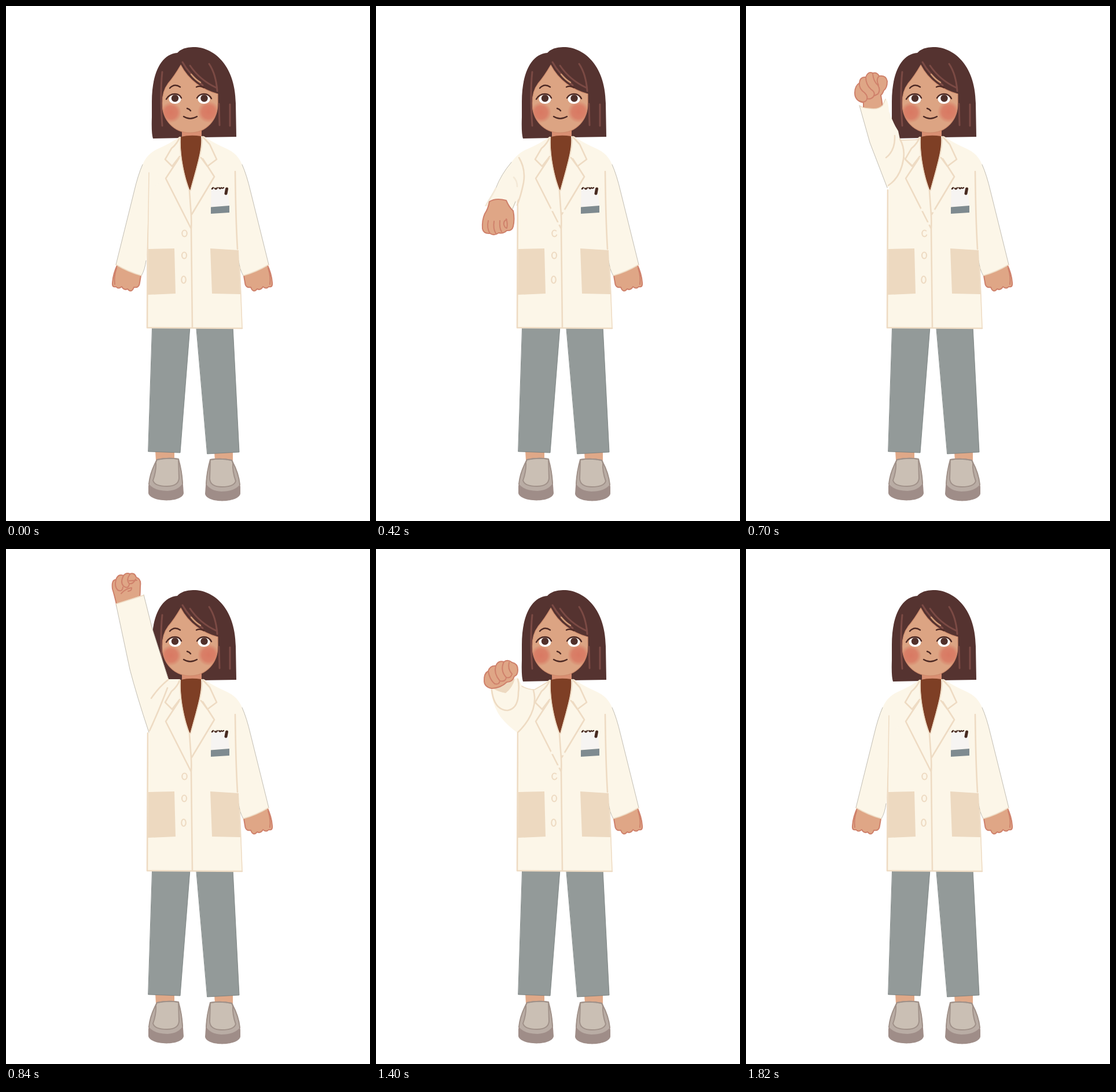
An HTML page for the animation above (1960 ms loop, 629 by 890 pixels).

```html
<!DOCTYPE html>
<html lang="en">
<head>
<meta charset="utf-8">
<title>Raising a hand</title>
<style>
  html, body { margin: 0; width: 100%; height: 100%; overflow: hidden; background: #fff; }
  svg { display: block; width: 100%; height: 100%; }
  path, ellipse { stroke-linecap: round; stroke-linejoin: round; }
  .coat { fill: #fcf6e8; }
  .edge { stroke: #b3aea2; stroke-width: .8; fill: none; }
  .seam { fill: none; stroke: #eedbc3; stroke-width: 2.6; }
  .thin { stroke-width: 1.5; }
  .soft { stroke: #f4e9d7; }
  .pocket { fill: #edd9c0; }
  .skin { fill: #dfa888; }
  .hand { fill: #dfa686; stroke: #cf816b; stroke-width: 2; }
  .fold { fill: none; stroke: #cf816b; stroke-width: 2; }
  .ink { fill: none; stroke: #4d2a25; stroke-width: 2.4; }
  .strand { fill: none; stroke: #7b4a44; stroke-width: 3; }
  .pants { fill: #939a99; stroke: #727978; stroke-width: .8; }
  .pose, #gaps { visibility: hidden; }
  #rest { visibility: visible; }
</style>
</head>
<body>
<svg viewBox="0 0 629 890" xmlns="http://www.w3.org/2000/svg">
  <defs>
    <radialGradient id="blush">
      <stop offset="0" stop-color="#d8745f" stop-opacity=".9"/>
      <stop offset=".6" stop-color="#d8745f" stop-opacity=".75"/>
      <stop offset="1" stop-color="#d8745f" stop-opacity="0"/>
    </radialGradient>
    <path id="face" d="M302 102Q291 121 280 134Q270 147 270 168C270 197 290 219 318 219C346 219 366 197 366 168V152Q346 147 329 134Q312 121 302 102Z"/>
    <clipPath id="faceClip"><use href="#face"/></clipPath>

    <g id="restArm">
      <path class="hand" d="M193 446L234 460L231 478Q230 488 221 486Q217 497 210 489Q204 492 200 485Q194 490 190 485Q183 487 184 478Q185 463 193 446Z"/>
      <path class="fold" d="M191 453Q186 468 188 481"/>
      <path class="coat" d="M301 226Q283 238 262 247Q244 255 236 274Q228 292 221 322L190 447Q212 460 234 466Q242 450 243 430L247 320L272 300L280 260Z"/>
      <path class="edge" d="M236 274Q228 292 221 322L190 447M234 466Q240 456 242 440"/>
      <path class="seam thin" d="M190 447Q212 460 234 466"/>
    </g>

    <g id="shoe">
      <path fill="#9f8d88" d="M260 784Q249 806 246 830L246 842C250 858 304 859 307 842L306 828Q304 800 298 783Z"/>
      <path fill="#b9aca4" d="M260 784Q249 806 247 826Q256 838 279 838Q298 837 305 825Q303 802 298 783Z"/>
      <path fill="#cabfb4" stroke="#a09189" stroke-width="2" d="M261 784Q280 780 298 783L299 816Q298 830 278 830Q257 830 254 820Q260 803 259 788Z"/>
      <path fill="none" stroke="#a09189" stroke-width="2" d="M261 784Q280 780 298 783Q304 804 305 825M260 786Q249 806 247 826"/>
    </g>
  </defs>

  <!-- legs -->
  <path class="skin" d="M258 769H291V785H259ZM360 770H392V787H361Z"/>
  <path class="pants" d="M253 554H318L301 772L246 770ZM329 554H392L403 771L348 774Z"/>
  <use href="#shoe"/>
  <use href="#shoe" transform="translate(651 1) scale(-1 1)"/>

  <!-- head -->
  <path fill="#553330" d="M254 229Q251 220 252 192V166C252 116 268 83 296 81Q305 71 323 71C355 70 396 98 397 168L398 226L337 227L304 228Z"/>
  <path fill="#d98f72" d="M304 208H338V229H304Z"/>
  <use href="#face" fill="#dca483" stroke="#cd8a6c" stroke-width="1.2"/>
  <g clip-path="url(#faceClip)">
    <circle cx="285" cy="184" r="18" fill="url(#blush)"/>
    <circle cx="350" cy="183" r="19" fill="url(#blush)"/>
  </g>
  <path class="strand" d="M270 114Q266 150 270 207M305 97Q316 117 340 137M318 103Q335 128 363 141M351 100Q363 118 365 147M368 169L369 206M387 170V207"/>
  <path fill="none" stroke="#cf9b75" stroke-width="2.5" d="M320 118Q327 127 336 132"/>
  <g id="eyes">
    <ellipse cx="292" cy="161" rx="10.5" ry="8" fill="#fff"/>
    <ellipse cx="342" cy="161" rx="10.5" ry="8" fill="#fff"/>
    <circle cx="292" cy="159.500" r="6.2" fill="#50302a"/>
    <circle cx="342.500" cy="159.500" r="6.2" fill="#50302a"/>
    <path class="ink" d="M277 161Q282 152 292 152Q300 152 303 159M330 159Q334 152 342 152Q351 152 355 160"/>
  </g>
  <path class="ink" d="M283 142Q291 133 301 140M329 140Q335 137 342 141M313 177Q317 178 319 181M307 191Q318 198 330 191"/>

  <!-- coat -->
  <path class="coat" d="M300 226L274 243Q266 285 247 314L243 557H409L404 440L398 280L352 232L342 225Z"/>
  <use href="#restArm" transform="translate(644 0) scale(-1 1)"/>
  <path class="seam" d="M396 286Q397 370 400 420M245 318Q244 440 244 556L408 557"/>
  <path class="seam thin" d="M404 450L408 556"/>
  <path class="pocket" d="M246 420L291 419L293 497L245 499ZM353 419L402 422L405 498L356 497Z"/>

  <!-- arm poses -->
  <g class="pose" id="rest">
    <use href="#restArm"/>
    <path class="seam thin" d="M247 288L245 420"/>
  </g>

  <g class="pose" id="lift">
    <path class="coat" d="M301 226Q283 238 262 247Q246 254 238 270L222 302Q208 335 203 370L194 414Q203 425 243 418L247 375L262 300L278 268Z"/>
    <path class="edge" d="M222 302Q208 335 203 370L194 414"/>
    <path class="seam" d="M243 265Q260 278 259 305Q257 350 248 375Q243 394 243 414"/>
    <path class="seam soft" d="M239 322Q248 338 249 354"/>
    <path class="hand" d="M203 406Q215 398 232 403Q235 412 243 418Q247 428 246 443Q245 454 235 455Q230 461 221 460Q215 465 207 461Q195 463 194 453Q192 438 196 428Q202 416 203 406Z"/>
    <path class="fold" d="M205 437Q202 450 206 460M215 437Q213 449 217 460M226 435Q224 448 228 457M237 434Q231 433 230 439Q230 446 234 450Q238 442 235 432"/>
  </g>

  <g class="pose" id="bend">
    <path class="coat" d="M301 226Q283 238 262 247Q246 253 234 270Q216 291 207 315L189 345L234 356L245 335L262 295L278 268Z"/>
    <path class="edge" d="M234 270Q216 291 207 315L189 345M234 355L241 338"/>
    <path class="seam" d="M247 262Q259 282 255 305Q251 326 244 344"/>
    <path class="seam soft" d="M238 296Q244 302 244 312M207 315Q201 327 190 345"/>
    <path class="hand" d="M196 338Q207 331 225 336Q230 348 237 354Q240 368 237 381Q235 389 226 388Q220 394 212 392Q204 398 197 393Q186 394 184 385Q183 370 188 359Q194 350 196 338Z"/>
    <path class="fold" d="M194 371Q191 384 197 393M204 372Q202 385 207 393M214 371Q213 384 217 390M226 369Q220 371 221 378Q223 384 226 384Q228 376 225 368"/>
  </g>

  <g class="pose" id="punch">
    <path class="coat" d="M301 226L274 243Q260 241 252 236L245 222L198 242Q202 272 215 290Q228 306 245 318L262 304L280 270Z"/>
    <path class="pocket" d="M202 241L240 224Q236 240 224 249Q212 247 202 241Z"/>
    <path class="seam" d="M200 244Q204 278 227 279Q246 276 246 248Q248 236 245 225M272 244Q279 269 263 295Q254 309 245 317"/>
    <path class="seam thin" d="M252 237Q262 243 274 243L300 228"/>
    <path class="hand" d="M200 241Q188 239 187 229Q186 215 194 211Q197 201 207 202Q211 192 221 195Q228 190 235 196Q245 198 245 209Q245 218 239 220Q236 230 226 230Q216 240 200 241Z"/>
    <path class="fold" d="M194 211Q196 225 205 233Q213 235 214 228Q203 215 207 202M214 228Q224 230 225 222Q214 210 221 195M225 222Q233 224 235 216Q227 207 230 196"/>
  </g>

  <g class="pose" id="raise">
    <path class="hand" d="M203 184V167Q188 164 188 150Q188 138 196 133Q197 122 207 123Q211 112 219 116Q226 114 230 121Q242 119 244 130Q244 142 238 146Q236 152 233 154L237 180Z"/>
    <path class="fold" d="M196 133Q195 143 205 150Q212 157 208 163Q204 168 196 164M207 123Q207 136 216 144Q225 150 220 157Q215 162 209 160M219 117Q220 130 228 137Q233 145 228 152L222 155M230 121Q224 127 229 137"/>
    <path class="coat" d="M196 172Q203 177 212 177Q228 180 236 172L241 160Q246 163 247 182Q254 202 263 216L266 230L300 231L280 268L262 304L244 314L214 236Z"/>
    <path class="edge" d="M196 172L214 236L244 314"/>
    <path class="seam" d="M266 230Q275 246 272 265Q267 296 246 310M257 224Q258 250 242 262"/>
    <path class="seam thin" d="M196 172Q203 177 212 177Q228 180 236 172L241 161M268 232L298 231M273 262L288 276"/>
  </g>

  <g class="pose" id="top">
    <path class="hand" d="M192 100Q187 78 184 69Q182 53 190 53Q194 42 203 46Q208 40 214 43Q222 40 225 49Q234 52 232 64Q232 74 231 86Z"/>
    <path class="fold" d="M190 53Q187 65 193 71Q201 75 202 66M203 46Q197 58 203 64Q211 70 213 61M214 44Q207 53 213 60Q220 61 224 52M213 55L226 54M199 77Q207 68 217 67Q218 72 211 73"/>
    <path class="coat" d="M190 95L238 79L252 135L281 225H301L280 270L262 295L247 317Q226 254 214 208Z"/>
    <path class="edge" d="M190 95L214 208Q226 254 247 317M238 79L252 135L280 223"/>
    <path class="seam" d="M280 226Q263 240 251 258M279 240Q264 280 248 314"/>
    <path class="seam thin" d="M190 95L238 80"/>
  </g>

  <!-- collar, lapels, buttons, badge -->
  <path fill="#7e3f25" d="M302 226Q319 222 337 225C339 246 332 268 318 319C310 300 300 260 302 226Z"/>
  <path class="seam" d="M300 227Q296 238 286 246L275 265L287 277L300 260M299 263L276 298L320 385M340 226L352 239L364 265L348 277L337 262M340 264L360 295L321 360M317 319L319 348Q321 370 320 385L322 556"/>
  <path class="seam thin" d="M301 227C299 260 309 300 317 320M339 226C340 246 333 268 319 319"/>
  <g class="seam" style="stroke-width:2.2">
    <ellipse cx="308.500" cy="393" rx="4.200" ry="5.500"/>
    <ellipse cx="308" cy="431" rx="4" ry="5.500"/>
    <ellipse cx="307" cy="473" rx="3.800" ry="6"/>
  </g>
  <g id="gaps" fill="#fcf6e8">
    <circle cx="304" cy="352" r="2.500"/>
    <circle cx="324" cy="354" r="2.800"/>
    <circle cx="315" cy="376" r="2.500"/>
    <circle cx="313" cy="392" r="3"/>
  </g>
  <path fill="#f6f4f2" d="M355 316L383 315L386 345L354 347Z"/>
  <path fill="#7f8b90" d="M354 347.500L386 345V357L354 359Z"/>
  <path fill="none" stroke="#472a20" stroke-width="2.500" d="M356 316L358 314M361 315Q363 318 365 314M368 314Q370 317 372 314M374 315L376 314"/>
  <path fill="none" stroke="#472a20" stroke-width="5" d="M381.500 316L380 324"/>
</svg>
<script>
  const LOOP = 1960;
  // start time in ms, pose
  const steps = [
    [0, "rest"], [280, "lift"], [420, "bend"], [560, "punch"], [700, "raise"], [840, "top"],
    [1260, "raise"], [1400, "punch"], [1540, "bend"], [1680, "lift"], [1820, "rest"]
  ];
  const poses = document.querySelectorAll(".pose");
  const gaps = document.getElementById("gaps");
  const show = (el, on) => { el.style.visibility = on ? "visible" : "hidden"; };
  const start = performance.now();

  function draw() {
    const t = (performance.now() - start) % LOOP;
    const name = steps.filter(([at]) => at <= t).pop()[1];
    poses.forEach(el => show(el, el.id === name));
    show(gaps, name !== "rest" && name !== "top");
    requestAnimationFrame(draw);
  }
  draw();
</script>
</body>
</html>
```
